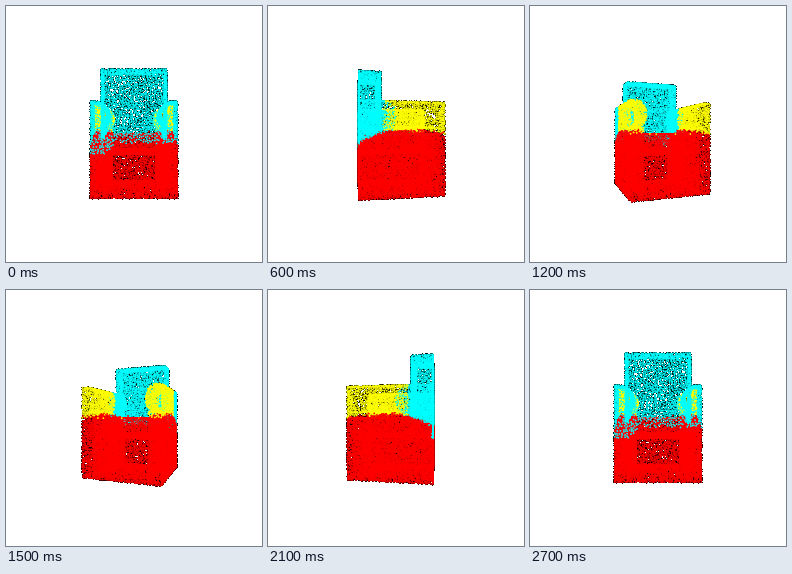
Recreate the animation shown at these times as a matplotlib script. Size 256x256 px, loop 3 s.

```python
import numpy as np
import matplotlib.pyplot as plt
from matplotlib.animation import FuncAnimation

SIZE, FRAMES, INTERVAL = 256, 10, 300
COUNT, POOL = 12000, 32000
FOCAL = SIZE / 2 / np.tan(np.radians(30))
DISTANCE = 3.0
RADIUS = 1.28
LAYERS = 8

W, D = 0.492, 0.497           # half width and half depth of the chair
FLOOR, ARM_TOP, TOP = -0.727, 0.372, 0.733
INNER, BACK_W, BACK_D = 0.345, 0.372, 0.245
SEAT, SEAT_BASE = 0.0, -0.235
ROLL_X, ROLL_Y, ROLL_RX, ROLL_RY = 0.42, 0.22, 0.11, 0.15

CYAN, YELLOW, RED = (0, 1, 1), (1, 1, 0), (1, 0, 0)
rng = np.random.default_rng(5)


def patch(origin, u, v):
    """A flat parallelogram as (area, sampler)."""
    origin, u, v = (np.array(a, float) for a in (origin, u, v))

    def sample(n):
        s, t = rng.random((2, n, 1))
        return origin + s * u + t * v

    return np.linalg.norm(np.cross(u, v)), sample


def box(x0, x1, y0, y1, z0, z1):
    ex, ey, ez = (x1 - x0, 0, 0), (0, y1 - y0, 0), (0, 0, z1 - z0)
    return [
        patch((x0, y0, z0), ex, ey), patch((x0, y0, z1), ex, ey),
        patch((x0, y0, z0), ex, ez), patch((x0, y1, z0), ex, ez),
        patch((x0, y0, z0), ey, ez), patch((x1, y0, z0), ey, ez),
    ]


def roll(side):
    """Rounded inner surface of an armrest."""
    def sample(n):
        a = rng.uniform(np.pi / 2, 3 * np.pi / 2, n)
        return np.column_stack((side * (ROLL_X + ROLL_RX * np.cos(a)),
                                ROLL_Y + ROLL_RY * np.sin(a),
                                rng.uniform(-D, D, n)))

    return np.pi * (ROLL_RX + ROLL_RY) / 2 * 2 * D, sample


def half_disc(side, z):
    def sample(n):
        a = rng.uniform(np.pi / 2, 3 * np.pi / 2, n)
        r = np.sqrt(rng.random(n))
        return np.column_stack((side * (ROLL_X + ROLL_RX * r * np.cos(a)),
                                ROLL_Y + ROLL_RY * r * np.sin(a),
                                np.full(n, z)))

    return np.pi * ROLL_RX * ROLL_RY / 2, sample


def arm(side):
    ledge = ROLL_Y - ROLL_RY
    depth = (0, 0, 2 * D)

    def wall(x0, y0, x1, y1):
        return patch((side * x0, y0, -D), (side * (x1 - x0), y1 - y0, 0), depth)

    parts = [
        wall(W, FLOOR, W, ARM_TOP), wall(ROLL_X, ARM_TOP, W, ARM_TOP),
        wall(INNER, FLOOR, W, FLOOR), wall(INNER, FLOOR, INNER, ledge),
        wall(INNER, ledge, ROLL_X, ledge), roll(side),
    ]
    for z in (-D, D):
        parts += [
            patch((side * INNER, FLOOR, z), (side * (W - INNER), 0, 0),
                  (0, ledge - FLOOR, 0)),
            patch((side * ROLL_X, ledge, z), (side * (W - ROLL_X), 0, 0),
                  (0, ARM_TOP - ledge, 0)),
            half_disc(side, z),
        ]
    return parts


def spread(pool, count):
    """Keep an evenly spaced subset by always taking the farthest point."""
    x, y, z = np.ascontiguousarray(pool.T, dtype=np.float32)
    gap = np.full(len(pool), np.inf, np.float32)
    chosen = np.zeros(count, int)
    for k in range(1, count):
        i = chosen[k - 1]
        dx, dy, dz = x - x[i], y - y[i], z - z[i]
        np.minimum(gap, dx * dx + dy * dy + dz * dz, out=gap)
        chosen[k] = gap.argmax()
    return pool[chosen]


def build_chair():
    parts = arm(1) + arm(-1)
    parts += box(-BACK_W, BACK_W, SEAT_BASE, TOP, BACK_D, D)
    parts += box(-INNER, INNER, SEAT_BASE, SEAT, -D, BACK_D)
    parts += box(-INNER, INNER, FLOOR, SEAT_BASE, -D, D)
    density = POOL / sum(area for area, _ in parts)
    pool = np.vstack([sample(round(area * density)) for area, sample in parts])
    return spread(pool, COUNT)


def paint(points):
    """Back and rear arms are cyan, front arms yellow, seat and base red."""
    x, y, z = points.T
    limit = 0.05 - 0.6 * np.maximum(0, z) ** 2 - 0.5 * np.maximum(0, -z - 0.2) ** 2
    limit -= 0.13 * np.clip((-x - 0.2) / 0.1, 0, 1) * (z > 0.48)
    limit += rng.normal(0, 0.008, len(x))
    split = 0.05 + 0.18 * np.clip((abs(x) - 0.31) / 0.18, 0, 1)
    colors = np.empty((len(x), 3))
    colors[:] = CYAN
    colors[z < split] = YELLOW
    colors[y < limit] = RED
    return colors


points = build_chair()
colors = paint(points)
steps = np.arange(-2, 3)
OFFSETS = np.array([(i, j) for j in steps for i in steps])


def render(angle):
    """Splat soft discs, blended front to back over black; bare pixels are white."""
    x, y, z = points.T
    c, s = np.cos(angle), np.sin(angle)
    depth = DISTANCE - (x * s + z * c)
    px = SIZE / 2 + FOCAL * (x * c - z * s) / depth
    py = SIZE / 2 - FOCAL * y / depth
    center = np.column_stack((px, py))
    cells = np.floor(center).astype(int)[:, None] + OFFSETS
    dist2 = ((cells + 0.5 - center[:, None]) ** 2).sum(-1)
    owner, slot = np.nonzero(dist2 < RADIUS ** 2)
    alpha = 1 - dist2[owner, slot] / RADIUS ** 2
    cell = cells[owner, slot]
    pixel = cell[:, 1] * SIZE + cell[:, 0]

    order = np.lexsort((depth[owner], pixel))
    pixel, alpha, owner = pixel[order], alpha[order], owner[order]
    _, first, counts = np.unique(pixel, return_index=True, return_counts=True)
    rank = np.arange(len(pixel)) - np.repeat(first, counts)

    image = np.zeros((SIZE * SIZE, 3))
    through = np.ones(SIZE * SIZE)
    for k in range(LAYERS):
        m = rank == k
        p, a = pixel[m], alpha[m]
        image[p] += (through[p] * a)[:, None] * colors[owner[m]]
        through[p] *= 1 - a
    bare = np.ones(SIZE * SIZE, bool)
    bare[pixel] = False
    image[bare] = 1
    return np.clip(image, 0, 1).reshape(SIZE, SIZE, 3)


fig = plt.figure(figsize=(SIZE / 100, SIZE / 100), dpi=100, facecolor="white")
ax = fig.add_axes([0, 0, 1, 1])
ax.axis("off")
picture = ax.imshow(render(0), interpolation="nearest", aspect="auto")


def update(i):
    # The last step completes the turn, so it repeats the opening pose.
    picture.set_data(render(2 * np.pi * (i % (FRAMES - 1)) / (FRAMES - 1)))
    return [picture]


anim = FuncAnimation(fig, update, frames=FRAMES, interval=INTERVAL,
                     repeat=True, repeat_delay=0, blit=False)
plt.show()
```
